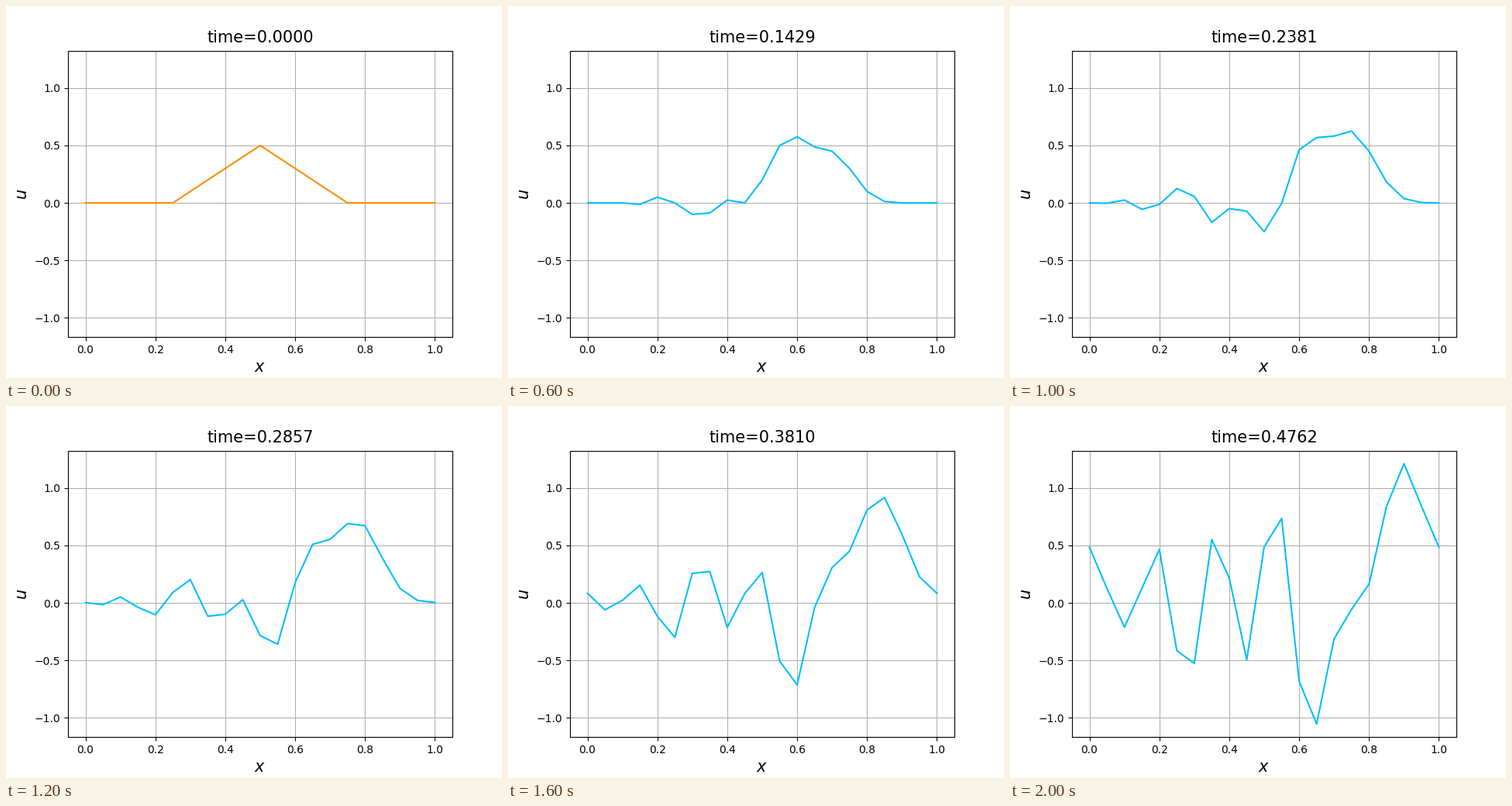
Write a matplotlib script that moves like this. It is 640 px wide and 480 px high and loops after 2.2 s.

```python
import matplotlib.pyplot as plt
import numpy as np
from matplotlib.animation import FuncAnimation

CELLS = 20
STEPS = 10
DT = 1 / 21
COURANT = 1.0


def advance(u):
    """One forward-time, centred-space step of periodic advection."""
    return u - COURANT / 2 * (np.roll(u, -1) - np.roll(u, 1))


def solve():
    x = np.arange(CELLS) / CELLS
    states = [np.maximum(0, 0.5 - 2 * np.abs(x - 0.5))]
    for _ in range(STEPS):
        states.append(advance(states[-1]))
    # repeat the first point at x = 1
    return [np.append(u, u[0]) for u in states]


x = np.linspace(0, 1, CELLS + 1)
states = solve()

fig, ax = plt.subplots(figsize=(6.4, 4.8), dpi=100)
ax.set_xlabel("$x$", fontsize=15)
ax.set_ylabel("$u$", fontsize=15)
ax.grid(True)

low, high = np.min(states), np.max(states)
margin = 0.05 * (high - low)
ax.set_xlim(-0.05, 1.05)
ax.set_ylim(low - margin, high + margin)

line, = ax.plot(x, states[0], color="darkorange", lw=1.5)
label = ax.text(0.5, 1.03, "", transform=ax.transAxes, ha="center", fontsize=15)


def draw(i):
    line.set_ydata(states[i])
    line.set_color("deepskyblue" if i else "darkorange")
    label.set_text(f"time={i * DT:.4f}")
    return line, label


anim = FuncAnimation(fig, draw, frames=STEPS + 1, init_func=lambda: draw(0),
                     interval=200, repeat=True, repeat_delay=0)
plt.show()
```
